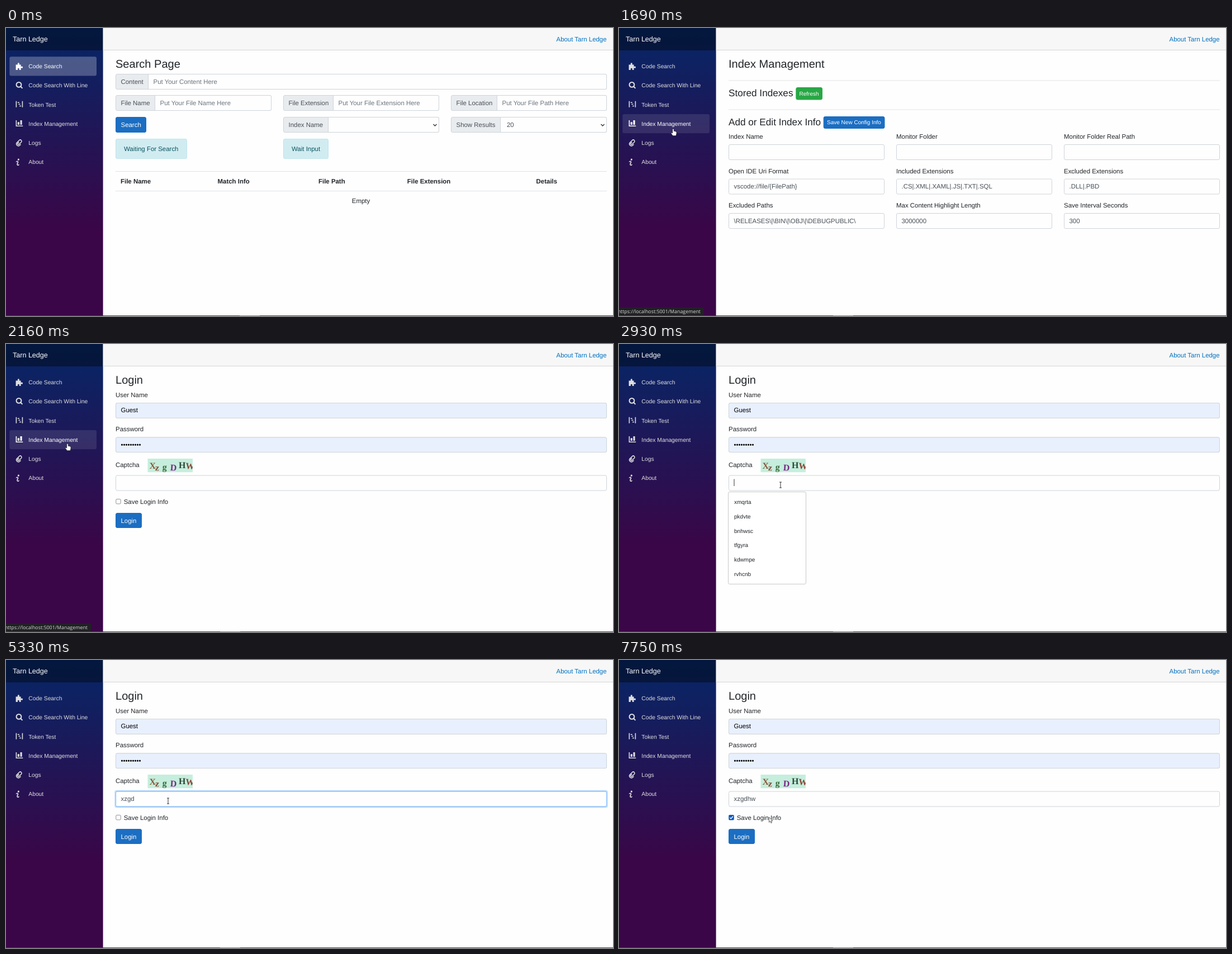
An HTML page for the animation above (7990 ms loop, 1086 px wide and 515 px high).

```html
<!DOCTYPE html>
<html lang="en">
<head>
<meta charset="utf-8">
<title>Tarn Ledge</title>
<style>
  html, body { margin: 0; width: 100%; height: 100%; overflow: hidden; background: #fefefe; }
  svg { display: block; width: 100%; height: 100%; }
  text { font: 11.45px "Liberation Sans", Arial, sans-serif; fill: #212529; white-space: pre; text-rendering: geometricPrecision; }
  .h3 { font-size: 20.05px; }
  .h4 { font-size: 17.18px; }
  .small { font-size: 10.02px; }
  .nav { font-size: 10.3px; }
  .brand { font-size: 12.55px; }
  .bold { font-weight: 700; }
  .white { fill: #fff; }
  .value { fill: #495057; }
  .hint { fill: #6c757d; }
  .info { fill: #0c5460; }
  .link { fill: #0071c1; }
  .black { fill: #000; }
  .url { font: 8.9px "Open Sans", "Noto Sans", sans-serif; fill: #d8d8d8; }
  .captcha { font: 700 16px "Liberation Serif", serif; }
  .icon { fill: #dfdfdf; stroke: none; }
  .icon.line { fill: none; stroke: #dfdfdf; }
  .row text { fill: #dfdfdf; }
  .row.lit text { fill: #fff; }
  .row.lit .icon { fill: #fff; }
  .row.lit .line { fill: none; stroke: #fff; }
</style>
</head>
<body>
<svg id="stage" viewBox="0 0 1086 515" xmlns="http://www.w3.org/2000/svg"></svg>
<script>
const LOOP = 7990;
const LEFT = 196.5, RIGHT = 1074.5;
const COLUMNS = [[196.5, 474.5], [496.5, 774.5], [796.5, 1074.5]];

// Drawing helpers
const text = (x, y, s, cls = "", extra = "") => `<text x="${x}" y="${y}" class="${cls}" ${extra}>${s}</text>`;
const rect = (x, y, w, h, fill, extra = "") =>
  `<rect x="${x}" y="${y}" width="${w}" height="${h}" fill="${fill}" ${extra}/>`;
const box = (x, y, r, b, fill = "#fefefe", stroke = "#ced4da", extra = "") =>
  rect(x, y, r - x, b - y, fill, `rx="2.5" stroke="${stroke}" ${extra}`);
const rule = (y, color = "#e5e5e5") => rect(196, y, 879, 1, color);
const group = (id, body) => `<g id="${id}">${body}</g>`;

const button = (x, y, r, b, label, tx, cls = "", fill = "#1b6ec2") =>
  box(x, y, r, b, fill, fill) + text(tx, (y + b) / 2 + (cls ? 3.4 : 4), label, "white " + cls);

const labelled = (x, split, r, y, label, value, cls = "hint") =>
  box(x, y, r, y + 27, "#e9ecef") +
  `<path d="M${split} ${y}H${r - 2.5}q2.5 0 2.5 2.5v22q0 2.5-2.5 2.5H${split}z" fill="#fefefe" stroke="#ced4da"/>` +
  text(x + 9, y + 17.5, label, "value") + text(split + (cls === "hint" ? 9 : 11.5), y + 17, value, cls);

const chevron = (x, y) => `<path d="M${x - 3} ${y - 1.5}l3 3 3-3" fill="none" stroke="#333" stroke-width="1.3"/>`;
const notice = (x, r, label) => box(x, 198.5, r, 233.5, "#d1ecf1", "#bee5eb") + text(x + 14.5, 219.9, label, "info");

const field = (column, y, label, value) => {
  const [x, r] = COLUMNS[column];
  return text(x - .5, y - 10.4, label) + box(x, y, r, y + 27) + text(x + 9, y + 17.4, value, "value");
};

// Sidebar, icons on an 8 unit grid
const ROWS = [
  ["Code Search", "M0 2h2.3q-.3-.6-.3-1a1 1 0 0 1 2 0q0 .4-.3 1h2v2.3q.6-.3 1.2-.3a1 1 0 0 1 0 2q-.6 0-1.2-.3V8H3.7q.3-.6.3-1a1 1 0 0 0-2 0q0 .4.3 1H0z"],
  ["Code Search With Line", "M6.2 3.1A2.8 2.8 0 1 1 .6 3.1A2.8 2.8 0 1 1 6.2 3.1M5.4 5.1L7.5 7.2", 1.3],
  ["Token Test", "M0 0v7h1V0zM7 0v7h1V0zM2 1v1h2V1zM3 3v1h2V3zM4 5v1h2V5z"],
  ["Index Management", "M0 0v7h8V6H1V0zM5 0v5h2V0zM2 2v3h2V2z"],
  ["Logs", "M5.6 5.6L4.3 6.8A2.2 2.2 0 0 1 1.2 3.7L3.9.9A1.5 1.5 0 0 1 6.1 3.1L3.6 5.6A.9.9 0 0 1 2.3 4.3L3.6 3", 1],
  ["About", "M3 0a1 1 0 0 0 0 2a1 1 0 0 0 0-2zM1.5 2.5Q.2 2.6 0 4h1q.1-.5.5-.5t.5.5Q1 5.6 1 6.5 1.1 8 2.5 8 3.9 7.9 4 6.5H3q-.1.5-.5.5T2 6.5Q3 4.8 3 4 2.9 2.5 1.5 2.5z"]
];
const ROW_TOP = 51.3, ROW_STEP = 34.25;

const sidebarRow = ([label, d, stroke = 0], i) => {
  const y = ROW_TOP + i * ROW_STEP;
  return `<g class="row">${rect(6.3, y, 155.7, 34.2, "#fff", 'rx="3" opacity="0"')}
    <path class="icon ${stroke ? "line" : ""}" stroke-width="${stroke}" d="${d}" transform="translate(17.6 ${y + 11}) scale(1.575)"/>
    ${text(40.3, y + 20.7, label, "nav")}</g>`;
};

const frameArt =
  rect(0, 0, 173.6, 515, "url(#side)") + rect(0, 0, 173.6, 40, "#000", 'opacity=".4"') +
  text(12, 24.4, "Tarn Ledge", "brand white") + ROWS.map(sidebarRow).join("") +
  rect(173.6, 0, 912.4, 40, "#f7f7f7") + rect(173.6, 39, 912.4, 1, "#d6d5d5") +
  text(1074.6, 23.5, "About Tarn Ledge", "link", 'text-anchor="end"');

// Pages
const searchPage =
  text(196, 71.2, "Search Page", "h3") +
  labelled(LEFT, 254.5, RIGHT, 82.5, "Content", "Put Your Content Here") +
  labelled(LEFT, 266.5, 474.5, 120.5, "File Name", "Put Your File Name Here") +
  labelled(496.5, 585.5, 774.5, 120.5, "File Extension", "Put Your File Extension Here") +
  labelled(796.5, 878.5, RIGHT, 120.5, "File Location", "Put Your File Path Here") +
  button(LEFT, 159.5, 250.5, 186.5, "Search", 205.5) +
  labelled(496.5, 576.5, 774.5, 159.5, "Index Name", "", "value") + chevron(767.5, 173.5) +
  labelled(796.5, 884.5, RIGHT, 159.5, "Show Results", "20", "value") + chevron(1067.5, 173.5) +
  notice(LEFT, 323.5, "Waiting For Search") + notice(496.5, 576.5, "Wait Input") +
  rule(256, "#dee2e6") + rule(291, "#dee2e6") +
  [[205, "File Name"], [378.5, "Match Info"], [559, "File Path"], [717.8, "File Extension"], [948.6, "Details"]]
    .map(([x, s]) => text(x, 278, s, "bold")).join("") +
  text(635, 313.4, "Empty", "", 'text-anchor="middle"');

const managePage =
  text(196, 71.2, "Index Management", "h3") + rule(93.5) +
  text(196, 121.7, "Stored Indexes", "h4") +
  button(316.9, 106.5, 363.5, 128, "Refresh", 322.5, "small", "#28a745") + rule(145.5) +
  text(196, 173.6, "Add or Edit Index Info", "h4") +
  button(366.2, 158.5, 475, 179.5, "Save New Config Info", 372, "small") +
  field(0, 208.5, "Index Name", "") +
  field(1, 208.5, "Monitor Folder", "") +
  field(2, 208.5, "Monitor Folder Real Path", "") +
  field(0, 270, "Open IDE Uri Format", "vscode://file/{FilePath}") +
  field(1, 270, "Included Extensions", ".CS|.XML|.XAML|.JS|.TXT|.SQL") +
  field(2, 270, "Excluded Extensions", ".DLL|.PBD") +
  field(0, 331.5, "Excluded Paths", "\\RELEASES\\|\\BIN\\|\\OBJ\\|\\DEBUGPUBLIC\\") +
  field(1, 331.5, "Max Content Highlight Length", "3000000") +
  field(2, 331.5, "Save Interval Seconds", "300");

const captcha = rect(253.5, 205, 80.5, 24.3, "#c5eedd") + '<g clip-path="url(#captchaClip)">' + [
  ["X", 256.5, 223, "#8a5a3a", 0], ["z", 266.5, 226, "#8a4a35", 6], ["g", 279.5, 225, "#3d6a3c", 4],
  ["D", 293.5, 226, "#7a2a86", 4], ["H", 309, 222, "#2c4a35", 0], ["W", 321, 223, "#8c4a3a", 4]
].map(([c, x, y, fill, turn]) =>
  text(x, y, c, "captcha", `style="fill:${fill}" transform="rotate(${turn} ${x} ${y})"`)).join("") + "</g>";

const loginPage =
  text(196, 71.2, "Login", "h3") +
  text(196, 94.5, "User Name") + box(LEFT, 105.5, RIGHT, 132.5) +
  text(196, 156.4, "Password") + box(LEFT, 167, RIGHT, 193.5) +
  group("filled",
    box(LEFT, 105.5, RIGHT, 132.5, "#e8f0fe") + text(205.5, 122, "Guest", "black") +
    box(LEFT, 167, RIGHT, 193.5, "#e8f0fe") + text(205.5, 183.8, "•".repeat(9), "black")) +
  text(196, 219.8, "Captcha") + captcha + box(LEFT, 235, RIGHT, 262) +
  group("ring",
    box(195.4, 233.9, 1075.6, 263.1, "none", "#007bff", 'stroke-opacity=".25" stroke-width="2.3"') +
    box(LEFT, 235, RIGHT, 262, "none", "#80bdff")) +
  text(205.5, 251.7, "", "value", 'id="typed"') + rect(0, 241.5, 1, 12.5, "#333", 'id="caret"') +
  rect(196.8, 277.4, 8.4, 8.4, "#fff", 'rx="1.5" stroke="#767676" stroke-width=".8"') +
  group("check", rect(196.4, 277, 9.2, 9.2, "#005cc8", 'rx="1.5"') +
    '<path d="M198.3 281.7l2 2 3.6-4.2" fill="none" stroke="#fff" stroke-width="1.4"/>') +
  text(210.7, 286, "Save Login Info") +
  button(LEFT, 302.5, 242.5, 328.5, "Login", 205.5) +
  group("popup", "");

const CURSORS = {
  arrow: '<path d="M0 0V9.2L2.1 7.2 3.6 10.6 5 10 3.5 6.7H6.4z" fill="#fff" stroke="#222" stroke-width=".7"/>',
  hand: '<path d="M-1.3.9Q0-.8 1.3.9V4.4Q2.3 3.900 2.900 4.700 3.900 4.300 4.500 5.200 6 5 6 6.600V9L5 12.700H-.7L-4 8.300Q-3.400 6.600-1.300 8z" fill="#fff" stroke="#111" stroke-width=".7"/>',
  beam: '<path d="M-2-5H2M0-5V5M-2 5H2" fill="none" stroke="#333"/>'
};

stage.innerHTML = `<defs>
    <linearGradient id="side" x1="0" y1="0" x2="0" y2="1">
      <stop stop-color="#052767"/><stop offset=".7" stop-color="#3a0647"/>
    </linearGradient>
    <clipPath id="captchaClip"><rect x="253.5" y="205" width="80.5" height="24.3"/></clipPath>
  </defs>` + frameArt +
  group("search", searchPage) + group("manage", managePage) + group("login", loginPage) +
  group("status", rect(-4, 499.5, 156, 15, "#202124", 'rx="2"') +
    text(146, 510.3, "https://localhost:5001/Management", "url", 'text-anchor="end"')) +
  rect(0, 514, 1086, 1, "#2f4a55") + rect(418, 514, 36, 1, "#4f8fa8", 'id="task"') +
  Object.entries(CURSORS).map(([id, body]) => group(id, body)).join("");

const $ = id => document.getElementById(id);
const rows = [...document.querySelectorAll(".row")];
const show = (id, on) => { $(id).style.display = on ? "" : "none"; };
const clamp = v => Math.min(1, Math.max(0, v));
const within = (t, spans) => spans.some(([a, b]) => t >= a && t < b);

// Pointer moves: first step, last step, number of steps, destination
const MOVES = [
  [70, 820, 11, 112, 193], [910, 910, 1, 104, 182], [990, 1080, 2, 97, 180],
  [1930, 2160, 3, 110, 178], [2240, 2930, 10, 289, 252], [3390, 3390, 1, 290, 252],
  [6510, 6510, 1, 291, 252], [6890, 6890, 1, 290.5, 252], [7140, 7450, 5, 268.5, 281]
];

function pointerAt(t) {
  let x = 1000, y = 515;
  for (const [start, end, steps, toX, toY] of MOVES) {
    if (t < start) break;
    const done = Math.floor(clamp((t - start) / (end - start || 1)) * (steps - 1) + 1e-6) + 1;
    const p = done / steps, eased = p * p * (3 - 2 * p);
    x += (toX - x) * eased;
    y += (toY - y) * eased;
  }
  return [x, y];
}

const KEYS = [3620, 4020, 4420, 4800, 5790, 6190];
const HISTORY = ["xmqrta", "pkdvte", "bnhwsc", "tfgyra", "kdwmpe", "rvhcnb"];
let listed = -1;

function drawPopup(t) {
  const count = t < 2930 || t >= 4020 ? 0 : t < 3620 ? 6 : 1;
  if (count === listed) return;
  listed = count;
  $("popup").innerHTML = count ? box(195.5, 264.5, 334.5, 274.5 + count * 25.8, "#fff", "#c8c8c8") +
    HISTORY.slice(0, count).map((s, i) => text(206, 286 + i * 25.8, s, "small")).join("") : "";
}

function drawPointer(t, page) {
  const [x, y] = pointerAt(t);
  const row = Math.floor((y - ROW_TOP) / ROW_STEP);
  const hovered = x > 6 && x < 162 && row < ROWS.length ? row : -1;
  rows.forEach((el, i) => {
    const active = page === "search" && i === 0;
    el.firstChild.setAttribute("opacity", i === hovered ? .1 : active ? .25 : 0);
    el.classList.toggle("lit", active || i === hovered);
  });
  const inField = page === "login" && x > LEFT && y > 235 && y < 262;
  const kind = t < 70 ? "" : hovered >= 0 ? "hand" : inField ? "beam" : "arrow";
  for (const id in CURSORS) show(id, id === kind);
  if (kind) $(kind).setAttribute("transform", `translate(${x} ${y})`);
}

function drawForm(t) {
  show("filled", t >= 2160);
  show("check", t >= 7670);
  $("ring").style.opacity = clamp((t - 2960) / 150) - clamp((t - 7490) / 150);
  $("typed").textContent = "xzgdhw".slice(0, KEYS.filter(k => t >= k).length);
  $("caret").setAttribute("x", 205.5 + $("typed").getComputedTextLength());
  show("caret", within(t, [[2930, 3460], [3620, 5330], [5790, 6740], [7240, 7520]]));
  drawPopup(t);
}

function draw() {
  const t = performance.now() % LOOP;
  const page = t < 1690 ? "search" : t < 2010 ? "manage" : "login";
  for (const id of ["search", "manage", "login"]) show(id, id === page);
  $("task").setAttribute("x", page === "search" ? 418 : 383);
  $("status").style.opacity = within(t, [[1310, 2540]]) ? 1 : within(t, [[1230, 2620]]) ? .5 : 0;
  drawForm(t);
  drawPointer(t, page);
  requestAnimationFrame(draw);
}
draw();
</script>
</body>
</html>
```
